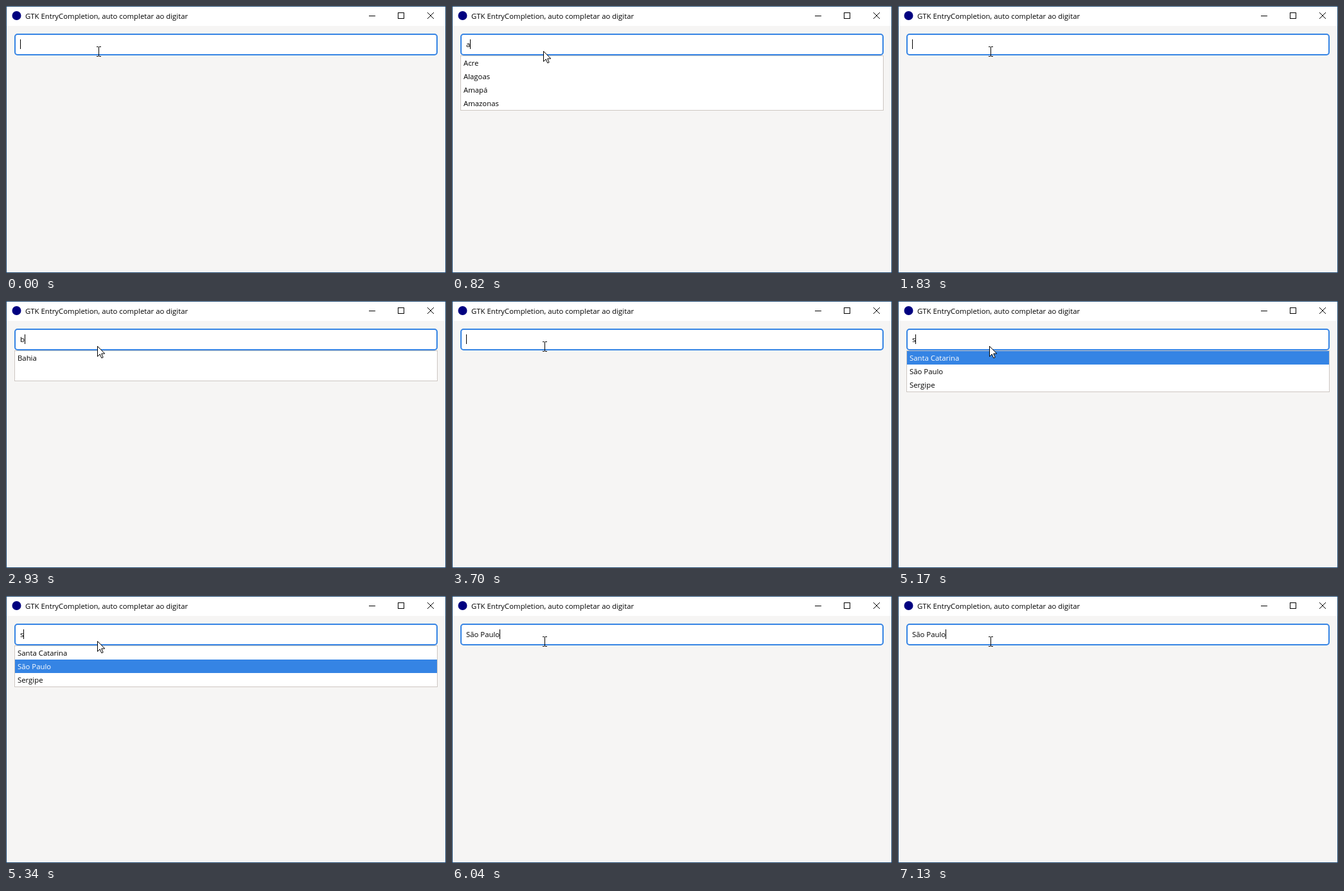
An HTML page with a canvas for the animation above (7.43 s loop, 685 by 416 pixels).

```html
<!DOCTYPE html>
<html lang="pt-BR">
<head>
<meta charset="utf-8">
<title>GTK EntryCompletion</title>
<style>
html, body { margin: 0; height: 100%; overflow: hidden; }
canvas { display: block; }
</style>
</head>
<body>
<canvas id="stage" width="685" height="416"></canvas>
<script>
const ctx = document.getElementById('stage').getContext('2d');
const LOOP = 7430, ROW = 21, BLUE = '#3584e4';
const LISTS = {
  a: ['Acre', 'Alagoas', 'Amapá', 'Amazonas'],
  b: ['Bahia'],
  s: ['Santa Catarina', 'São Paulo', 'Sergipe']
};

// Each step overrides the state from its start time on.
const EMPTY = { text: '', open: false, arrow: false, selected: -1, caret: true };
const STEPS = [
  [0, EMPTY],
  [670, { text: 'a' }],
  [740, { open: true }],
  [820, { arrow: true }],
  [1830, EMPTY],
  [2760, { text: 'b' }],
  [2930, { open: true, arrow: true }],
  [3700, EMPTY],
  [4320, { text: 's' }],
  [4400, { open: true, arrow: true }],
  [5170, { selected: 0 }],
  [5340, { selected: 1 }],
  [5490, { caret: false }],
  [5890, { caret: true }],
  [6040, { ...EMPTY, text: 'São Paulo' }],
  [6740, { caret: false }],
  [7130, { caret: true }]
];

function stateAt(time) {
  return Object.assign({}, ...STEPS.filter(([start]) => start <= time).map(([, change]) => change));
}

function rect(x, y, w, h, color) {
  ctx.fillStyle = color;
  ctx.fillRect(x, y, w, h);
}

function frame(x, y, w, h, color) {
  ctx.strokeStyle = color;
  ctx.lineWidth = 1;
  ctx.strokeRect(x + 0.5, y + 0.5, w - 1, h - 1);
}

function label(text, x, y, color = '#000') {
  ctx.fillStyle = color;
  ctx.fillText(text, x, y);
}

function drawWindow() {
  rect(0, 0, 685, 416, '#f6f5f4');
  rect(0, 0, 685, 31, '#fff');
  frame(0, 0, 685, 416, '#1c4670');
  ctx.fillStyle = '#000080';
  ctx.beginPath();
  ctx.arc(16.5, 15, 7, 0, 2 * Math.PI);
  ctx.fill();
  label('GTK EntryCompletion, auto completar ao digitar', 30, 20);

  rect(565, 15, 10, 1, '#000');
  frame(610, 10, 10, 10, '#000');
  ctx.stroke(new Path2D('M656 10l10 10M666 10l-10 10'));
}

function drawEntry({ text, caret }) {
  ctx.beginPath();
  ctx.roundRect(14, 44, 657, 32, 4);
  ctx.fillStyle = '#fff';
  ctx.fill();
  ctx.strokeStyle = BLUE;
  ctx.lineWidth = 2;
  ctx.stroke();
  label(text, 22, 64);
  if (caret) rect(22 + Math.round(ctx.measureText(text).width), 52, 1, 15, '#000');
}

function drawPopup({ text, selected }) {
  const rows = LISTS[text];
  const height = Math.max(48, rows.length * ROW + 2);
  rect(13, 77, 659, height, '#fff');
  frame(13, 77, 659, height, '#cdc7c2');
  rows.forEach((name, i) => {
    const y = 78 + i * ROW;
    if (i === selected) rect(14, y, 657, ROW, BLUE);
    label(name, 18, y + 15, i === selected ? '#fff' : '#000');
  });
}

function drawPointer(arrow) {
  if (arrow) {
    const shape = new Path2D('M142.5 70.5v16l3.7-3.6 2.6 5.9 2.4-1-2.5-5.8h5.1z');
    ctx.fillStyle = '#fff';
    ctx.fill(shape);
    ctx.strokeStyle = '#000';
    ctx.lineWidth = 1;
    ctx.stroke(shape);
  } else {
    rect(144, 64, 1, 14, '#000');
    for (const y of [63, 78]) {
      rect(141, y, 3, 1, '#000');
      rect(145, y, 3, 1, '#000');
    }
  }
}

function draw() {
  const state = stateAt(performance.now() % LOOP);
  ctx.font = '11.35px "Open Sans", "Noto Sans", sans-serif';
  drawWindow();
  drawEntry(state);
  if (state.open) drawPopup(state);
  drawPointer(state.arrow);
  requestAnimationFrame(draw);
}
draw();
</script>
</body>
</html>
```
